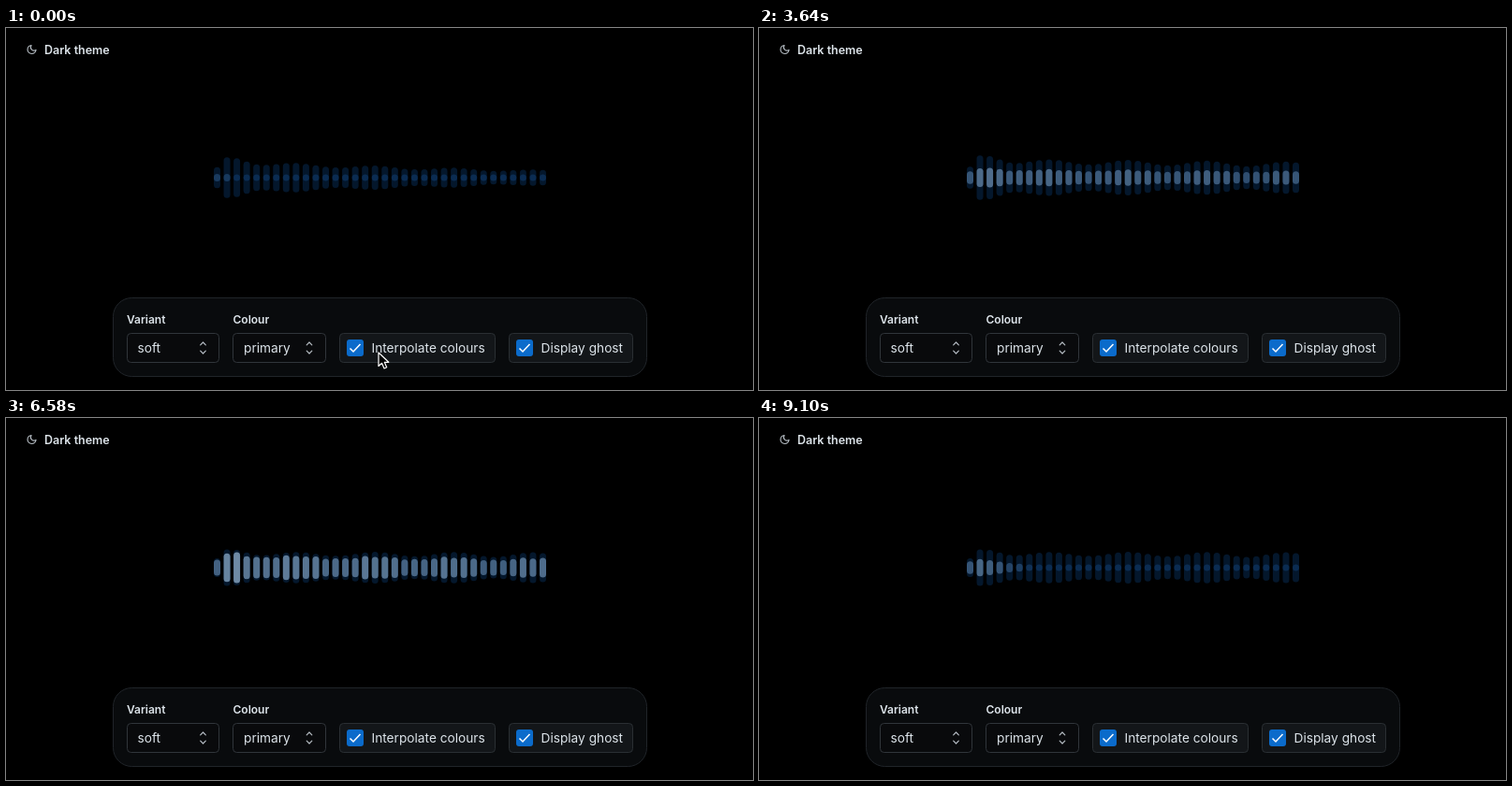
An HTML page for the animation above (9170 ms loop, 798x387 px).

```html
<!DOCTYPE html>
<html lang="en">
<head>
<meta charset="utf-8">
<title>Voice visualiser</title>
<style>
  html, body { margin: 0; width: 100%; height: 100%; overflow: hidden; background: #000; }
  svg { display: block; width: 100%; height: 100%; }
  text { font: 400 13.7px Inter, Roboto, sans-serif; fill: #dde4ea; }
  .label { font-size: 12px; font-weight: 600; }
  .title { font-size: 12.5px; font-weight: 600; }
  .icon { fill: none; stroke: #b4bbc2; stroke-width: 1.2; stroke-linecap: round; stroke-linejoin: round; }
  .moon { stroke-width: 2.3; }
  .select { fill: #090a0c; stroke: #30353a; }
  .option { fill: #131619; stroke: #2a2f33; }
</style>
</head>
<body>
<svg viewBox="0 0 798 387">
  <defs>
    <path id="chevrons" class="icon" d="M-2.8 -3.2L0 -6L2.8 -3.2M-2.8 3.2L0 6L2.8 3.2"/>
    <g id="checkbox">
      <rect width="18" height="18" rx="3" fill="#0b6bcb"/>
      <path d="M3.5 9.5L7 13L14.5 5" fill="none" stroke="#fff" stroke-width="1.5"/>
    </g>
  </defs>

  <path class="icon moon" transform="translate(21.5 17) scale(.5)"
        d="M21 12.79A9 9 0 1 1 11.21 3A7 7 0 0 0 21 12.79z"/>
  <text class="title" x="41" y="28">Dark theme</text>

  <g id="bars"></g>

  <rect x="114.5" y="288.5" width="570" height="84" rx="20" fill="#090b0d" stroke="#202429"/>
  <text class="label" x="129" y="316">Variant</text>
  <text class="label" x="242.5" y="316">Colour</text>

  <rect class="select" x="129.5" y="326.5" width="98" height="31" rx="4"/>
  <text x="140.5" y="347">soft</text>
  <use href="#chevrons" x="210.5" y="342"/>

  <rect class="select" x="242.5" y="326.5" width="99" height="31" rx="4"/>
  <text x="254" y="347">primary</text>
  <use href="#chevrons" x="324" y="342"/>

  <rect class="option" x="356.5" y="326.5" width="166" height="31" rx="4"/>
  <use href="#checkbox" x="364" y="333"/>
  <text x="390.5" y="347">Interpolate colours</text>

  <rect class="option" x="537.5" y="326.5" width="132" height="31" rx="4"/>
  <use href="#checkbox" x="545" y="333"/>
  <text x="571.5" y="347">Display ghost</text>

  <path id="cursor" d="M398 347V361.5L401.5 358.3L404 364L406.7 362.8L404.3 357.3H408.8Z"
        fill="#000" stroke="#fff" stroke-width="1.2" stroke-linejoin="round"/>
</svg>
<script>
const LOOP = 9170, STEP = 70, COUNT = 34, MID = 160, QUIET = 3.5;
const FIRST_X = 225.5, GAP = 348 / (COUNT - 1), WIDTH = 7;
const LOW = [11, 44, 82], HIGH = [118, 146, 172];

const clamp = v => Math.min(1, Math.max(0, v));
const mix = (a, b, u) => a + (b - a) * u;

// Loudness over time: [ms, bass gain, treble gain].
const speech = [
  [0, .1, -2.2], [280, 0, 0], [1540, 0, 0], [1960, 1, -.1], [2600, 1.3, 1.6], [3640, .5, .5],
  [4760, 1, 1], [5670, .87, .95], [7560, .9, .9], [8700, .8, .6], [9100, .5, -2.2], [LOOP, .5, -2.2]
];
const peaks = [
  [0, 1.3, .65], [2000, 1.3, .65], [2600, 1.4, 1.8], [4900, 1.4, 1.8], [5500, 1.1, 1.7], [LOOP, 1.1, 1.7]
];

// A voice: falling slope, low-pitched peak and evenly spaced formants.
function spectrum(i) {
  const slope = mix(10, 6, i / (COUNT - 1));
  const pitch = 4 * Math.exp(-(((i - 1.8) / 1.8) ** 2));
  const formants = 1.6 * Math.cos((i - 16) * Math.PI / 4);
  return (slope + pitch + formants) * (i ? 1 : .45);
}

function segmentAt(keys, time) {
  const k = keys.findIndex(key => key[0] > time);
  const [start, bass, treble] = keys[k - 1], [end, nextBass, nextTreble] = keys[k];
  const u = (time - start) / (end - start);
  return { u, duration: end - start, bass: mix(bass, nextBass, u), treble: mix(treble, nextTreble, u) };
}

function heightOf(i, { bass, treble }) {
  return QUIET + spectrum(i) * Math.max(0, mix(bass, treble, i / (COUNT - 1)));
}

function levelOf(i, segment, time) {
  const syllables = Math.max(1, Math.round(segment.duration / 450));
  const dip = 1 - .35 * Math.sin(Math.PI * syllables * segment.u) ** 2;
  const flutter = 1 + .1 * Math.sin(i * 2.4 + time / 110);
  return QUIET + (heightOf(i, segment) - QUIET) * dip * flutter;
}

function colourOf(level) {
  const u = clamp((level - QUIET) / 15) ** .6;
  return `rgb(${LOW.map((c, n) => Math.round(mix(c, HIGH[n], u)))})`;
}

function makeBar(i, fill) {
  const bar = document.createElementNS("http://www.w3.org/2000/svg", "rect");
  const attributes = { x: FIRST_X + i * GAP - WIDTH / 2, width: WIDTH, rx: WIDTH / 2, fill };
  for (const name in attributes) bar.setAttribute(name, attributes[name]);
  return document.getElementById("bars").appendChild(bar);
}

function setHeight(bar, half) {
  bar.setAttribute("y", MID - half);
  bar.setAttribute("height", half * 2);
}

const bars = Array.from({ length: COUNT }, (_, i) => ({ ghost: makeBar(i, "#04172c"), live: makeBar(i, "#000") }));
const cursor = document.getElementById("cursor");

function draw(now) {
  const time = Math.floor((now % LOOP) / STEP) * STEP;
  const voice = segmentAt(speech, time), peak = segmentAt(peaks, time);
  bars.forEach(({ ghost, live }, i) => {
    const level = levelOf(i, voice, time);
    setHeight(ghost, Math.max(level, heightOf(i, peak)));
    setHeight(live, level);
    live.setAttribute("fill", colourOf(level));
  });
  cursor.setAttribute("opacity", clamp(1 - time / 280));
  requestAnimationFrame(draw);
}
draw(0);
</script>
</body>
</html>
```
